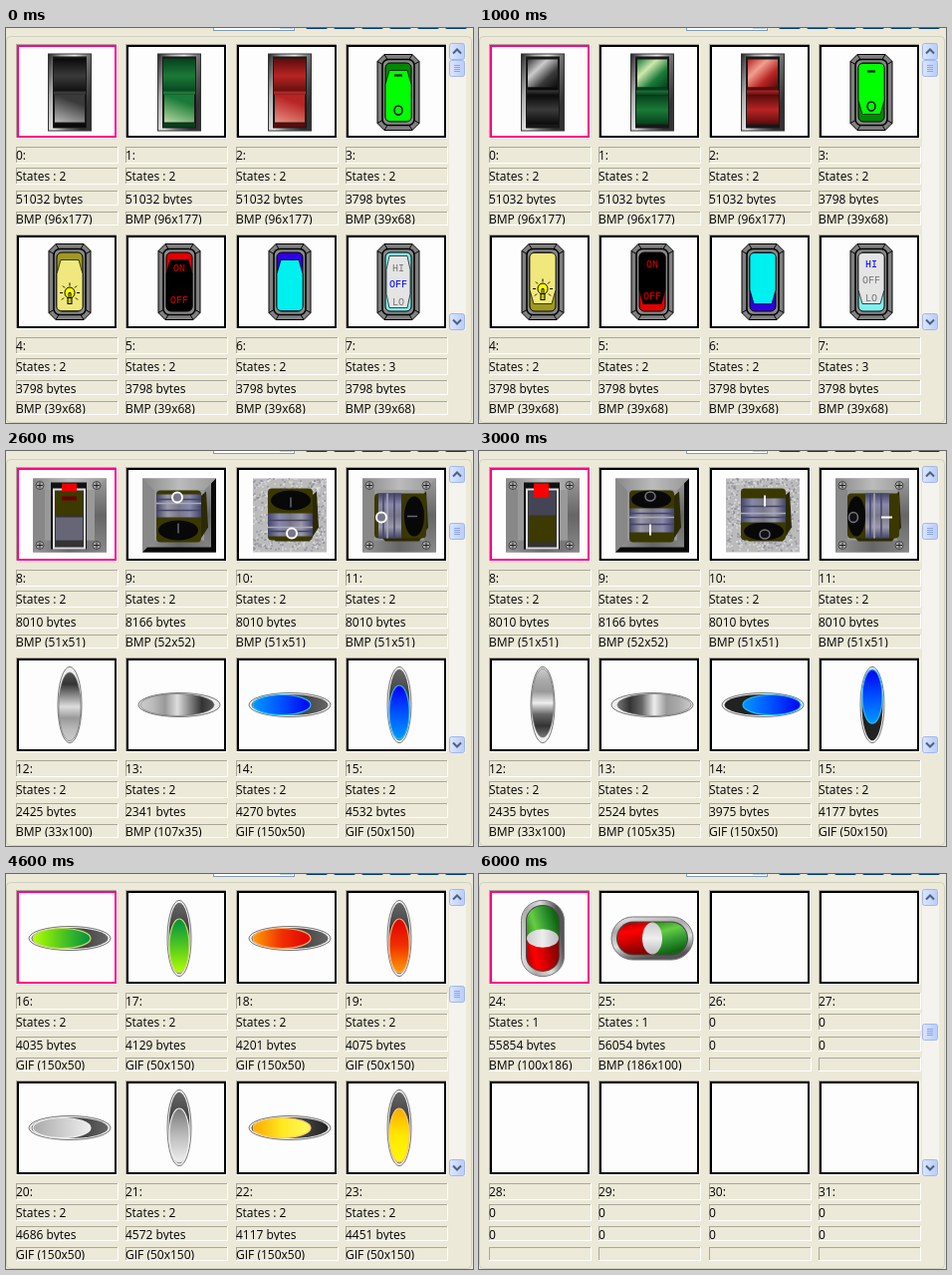
Write an HTML page that moves like this. It is 469 by 396 pixels and loops after 7000 ms.

```html
<!DOCTYPE html>
<html lang="en">
<head>
<meta charset="utf-8">
<title>Switch gallery</title>
<style>
html, body { margin: 0; width: 100%; height: 100%; overflow: hidden; background: #ece9d8; }
svg { display: block; }
text { font: 12px "Open Sans", "Noto Sans", sans-serif; }
.mono { font: 10px "Liberation Mono", monospace; text-anchor: middle; }
</style>
</head>
<body>
<svg id="stage" width="469" height="396"></svg>
<script>
// Drawing helpers: each returns SVG markup
let defs = '', ids = 0;
const rect = (x, y, w, h, fill, more = '') =>
  `<rect x="${x}" y="${y}" width="${w}" height="${h}" fill="${fill}" ${more}/>`;
const oval = (cx, cy, rx, ry, fill, more = '') =>
  `<ellipse cx="${cx}" cy="${cy}" rx="${rx}" ry="${ry}" fill="${fill}" ${more}/>`;
const path = (d, fill, more = '') => `<path d="${d}" fill="${fill}" ${more}/>`;
const line = (d, color, width = 1) => path(d, 'none', `stroke="${color}" stroke-width="${width}"`);
const group = (transform, body) => `<g transform="${transform}">${body}</g>`;
const black = 'stroke="#000"';

function grad(colors, x2 = 1, y2 = 0) {
  const list = colors.split(' '), id = 'g' + ids++;
  const stops = list.map((c, i) => `<stop offset="${i / (list.length - 1)}" stop-color="${c}"/>`);
  defs += `<linearGradient id="${id}" x2="${x2}" y2="${y2}">${stops.join('')}</linearGradient>`;
  return `url(#${id})`;
}

let seed = 7;
const random = () => (seed = seed * 16807 % 2147483647) / 2147483647;

// Pictures are centred on 0,0; state 0 or 1 picks the pose
const rocker = (dark, mid, light) => state => {
  const frame = rect(-21.5, -38.5, 43, 77, grad('#222 #aaa #eee #777 #333', 1, .5), 'stroke="#333"') +
    rect(-17, -36, 34, 72, '#181818');
  const shade = grad(`${dark} ${mid} ${dark}`, 0, 1);
  return frame + (state
    ? rect(-15, -33, 30, 28, grad(`${mid} ${light} ${mid} ${dark}`, 1, 1)) +
      rect(-15, -5, 30, 3, dark) + rect(-16, -2, 32, 5, grad(`${mid} ${dark}`, 0, 1)) +
      rect(-16, 3, 32, 29, shade)
    : rect(-16, -34, 32, 35, shade) + rect(-16, -1, 32, 3, mid) +
      rect(-15, 2, 30, 28, grad(`${mid} ${light}`, -.4, 1)) +
      rect(-16, 31, 32, 4, dark));
};

const housing = (face, lip, marks, neutral) => state => {
  const shape = neutral && !state
    ? 'M-9-26H9L12-12V12L9 26H-9L-12 12V-12Z'
    : 'M-9-22H9L13-8V25Q13 29 9 29H-9Q-13 29-13 25V-8Z';
  return path('M-14-38H14L21-31V31L14 38H-14L-21 31V-31Z', '#808080', black) +
    line('M-14-38L-11-33M14-38L11-33M-14 38L-11 33M14 38L11 33M-21-31L-16-28M21-31L16-28M-21 31L-16 28M21 31L16 28', '#000') +
    rect(-16, -33, 32, 66, '#888', 'rx="6" stroke="#000" stroke-width="1.6"') +
    rect(-13, -29.5, 26, 59, lip, `rx="5" ${black}`) +
    group(`scale(1 ${state ? -1 : 1})`, path(shape, face, 'stroke="#000" stroke-width=".7"')) +
    group(`translate(0 ${state ? -4 : 0})`, marks(state));
};
const word = (s, y, color) => `<text class="mono" y="${y + 3.5}" fill="${color}">${s}</text>`;
const onOff = () => line('M-4-17H4', '#000', 2) + oval(0, 18, 4, 4.5, 'none', 'stroke="#000" stroke-width="1.5"');
const bulb = () => oval(0, 11, 5, 5.5, '#ff0', black) + rect(-2, 16, 4, 6, '#cc0', black) +
  line('M0 1V4M-7 4L-5 6M7 4L5 6M-10 11H-7M10 11H7M-8 18L-6 16M8 18L6 16M-1 16V11H1V16', '#000');
const levels = state => word('HI', -14, state ? '#00f' : '#777') +
  word('OFF', 2, state ? '#777' : '#00f') + word('LO', 20, '#777');

const bevel = () => rect(-37, -37, 74, 74, '#888') +
  path('M-37-37H37L25-25H-25Z', grad('#888 #bbb #999')) + path('M37-37V37L25 25V-25Z', grad('#999 #666 #888', 0, 1)) +
  path('M-37 37H37L25 25H-25Z', grad('#999 #666 #888')) + rect(-25, -25, 50, 50, '#999');
const darkPlate = () => bevel() + path('M37-37V37H-37L-32 32H32V-32Z', '#080808');
const screwedPlate = () => bevel() + [-30, 27].map(x => [-30, 30].map(y =>
  oval(x, y, 4, 4, '#aaa', 'stroke="#444"') + line(`M${x - 3} ${y}h6m-3-3v6`, '#222')).join('')).join('');
function speckledPlate() {
  let dots = rect(-37, -37, 74, 74, '#bbb');
  for (let i = 0; i < 600; i++) {
    dots += rect(Math.floor(random() * 73) - 37, Math.floor(random() * 73) - 37, 2, 1, random() < .5 ? '#e4e4e4' : '#889');
  }
  return dots;
}

const plateSwitch = state => screwedPlate() +
  rect(-19, -33, 36, 67, '#111') + rect(-16, -26, 31, 59, '#333', 'stroke="#ddd" stroke-width="2"') +
  (state
    ? rect(-14, -24, 27, 24, '#445') + rect(-14, 1, 27, 26, '#3c3a00') + rect(-9, -32, 15, 14, '#f00')
    : rect(-14, -24, 27, 24, '#3c3a00') + rect(-8, -32, 15, 8, '#e00') +
      rect(-8, -19, 15, 4, '#600') + rect(-14, 2, 27, 23, '#667'));

const knob = (plate, angle) => state => {
  const band = (y, h) => rect(-23, y, 45, h, grad('#446 #99a #778 #88a #446')) +
    line(`M-23 ${y + 5}h45m-45 11h45`, '#446', 1.5) + line(`M-23 ${y + 9}h45`, '#aab', 1.5);
  const olive = '#3a3800';
  return plate() + path('M20-18L27-24 29 12 20 26H-14L-20 20Z', '#2c2a00') + group(`rotate(${angle})`,
    rect(-23, -25, 45, 52, olive, 'rx="4"') + (state
      ? oval(-1, -16, 20, 9, '#080808') + oval(-2, -19, 5, 4.5, '#111', 'stroke="#778" stroke-width="1.5"') +
        band(-7, 24) + line('M-2 9V20', '#fff', 2)
      : band(-21, 23) + oval(-2, -18, 5, 5, '#778', 'stroke="#fff" stroke-width="2"') +
        oval(-1, 15, 20, 10, '#080808') + line('M-1 8V18', '#667', 1.5)));
};

const upright = body => group('rotate(-90) scale(.93 1)', body);
const ring = oval(0, 0, 41, 12, '#eee', 'stroke="#555" stroke-width=".8"');
const steel = vertical => state => {
  const body = ring + oval(state ? 2 : -2, 0, 37, 11,
    grad(state ? '#777 #333 #666 #eee #999 #aaa #ccc' : '#ccc #bbb #999 #ddd #888 #333 #555'),
    'stroke="#666" stroke-width=".6"');
  return vertical ? upright(body) : body;
};
const slider = (colors, rim, vertical, bases = ['#666', '#222']) => state => {
  const body = ring + oval(0, 0, 38.5, 10.5, grad(`${bases[state]} ${bases[state]} #444 ${bases[state]}`)) +
    oval(state ? 9 : -8, 0, 29, 10, grad(colors), `stroke="${rim}" stroke-width="1.2"`);
  return vertical ? upright(body) : body;
};
const capsule = vertical => () => {
  const body = rect(-41, -21.5, 82, 43, grad('#eee #aaa #ddd #555', .3, 1), 'rx="21.5" stroke="#777"') +
    rect(-36, -17, 72, 34, '#444', 'rx="17"') +
    path('M0-16H-19A16 16 0 0 0-19 16H0Z', grad('#900 #f00 #c00 #800', .2, 1)) +
    path('M0-16H19A16 16 0 0 1 19 16H0Z', grad('#2a8a1a #6c4 #393 #161', .3, 1)) +
    oval(0, 0, 10, 16, grad('#ccc #eee #bbb', 0, 1));
  return vertical ? upright(body) : body;
};

const blue = '#0098ff #0050ff #0000f0', green = '#b0ff00 #50c820 #009040', red = '#ff9c00 #f03000 #e00000';
const pictures = [
  rocker('#0a0a0a', '#3a3a3a', '#ccc'), rocker('#06401c', '#1a7a38', '#cfe8b0'),
  rocker('#5a0c0c', '#b82424', '#f0a090'), housing('#0f0', '#080', onOff),
  housing('#f0e87c', '#a09820', bulb), housing('#000', '#e00000', () => word('ON', -14, '#d00') + word('OFF', 18, '#d00')),
  housing('#00f0f0', '#3000e0', () => ''), housing('#e4e4e4', '#80f0f0', levels, true),
  plateSwitch, knob(darkPlate, 0), knob(speckledPlate, 180), knob(screwedPlate, -90),
  steel(true), steel(false), slider(blue, '#2bf'), slider(blue, '#2bf', true),
  slider(green, '#cd6'), slider(green, '#cd6', true),
  slider(red, '#fa6'), slider(red, '#fa6', true),
  slider('#aaa #ccc #eee', '#eee'), slider('#eee #bbb #777', '#eee', true),
  slider('#ffa800 #ffe820 #fff860', '#fc6', false, ['#222', '#666']), slider('#fff800 #ffe800 #ffa800', '#fc6', true),
  capsule(true), capsule(false)
];

// One entry per second: page, file sizes, picture formats
const switches = [0, '51032 51032 51032 3798 3798 3798 3798 3798',
  '96x177 96x177 96x177 39x68 39x68 39x68 39x68 39x68'];
const ovals = '150x50 50x150 150x50 50x150 150x50 50x150 150x50 ';
const scenes = [
  switches, switches,
  [1, '8010 8166 8010 8010 2425 2341 4270 4532', '51x51 52x52 51x51 51x51 33x100 107x35 150x50 50x150'],
  [1, '8010 8166 8010 8010 2435 2524 3975 4177', '51x51 52x52 51x51 51x51 33x100 105x35 150x50 50x150'],
  [2, '4035 4129 4201 4075 4686 4572 4117 4451', ovals + '50x150'],
  [2, '4168 4346 3773 4071 4337 4413 4086 4153', ovals + '50x153'],
  [3, '55854 56054', '100x186 186x100']
];

const label = (y, h, baseline, s) =>
  rect(0, y, 103, h, '#fff') + rect(0, y, 102, h - 1, '#aca899') + rect(1, y + 1, 101, h - 2, '#ece9d8') +
  `<svg y="${y}" width="102" height="${h - 1}"><text y="${baseline}">${s}</text></svg>`;

function cell(i, index, state, size, format) {
  const row = i >> 2, used = index < pictures.length;
  const lines = used
    ? [`States : ${index > 23 ? 1 : index === 7 ? 3 : 2}`, `${size} bytes`,
       `${index > 13 && index < 24 ? 'GIF' : 'BMP'} (${format})`]
    : ['0', '0', ''];
  return group(`translate(${[10, 120, 231, 341][i % 4]} ${16 + row * 191})`,
    rect(0, 0, 102, 95, '#fff') + rect(0, 0, 101, 94, '#aca899') +
    rect(2, 2, 98, 91, '#fdfdfd', `stroke="${i ? '#000' : '#f08'}" stroke-width="2"`) +
    (used ? group(`translate(${index === 3 || index === 7 ? 53 : 54} ${row ? 47.5 : 48.5})`, pictures[index](state)) : '') +
    label(103, 17, 13, index + ':') + label(124, 17, 13, lines[0]) +
    label(147 - row, 15, 13, lines[1]) + label(168 - row, 14, 12, lines[2]));
}

const button = (y, mark = '') => group(`translate(445 ${y})`,
  rect(.5, .5, 15, 16, grad('#dce6ff #b8ccf8'), 'rx="2" stroke="#a4b8e8"') + mark);
const chevron = d => line(d, '#4d6185', 2);
const grip = line('M5 5.5H11M5 7.5H11M5 9.5H11M5 11.5H11', '#8ca6e0');

function scene([page, sizes, formats], n) {
  const size = sizes.split(' '), format = formats.split(' ');
  let body = button([32, 72, 112, 150][page], grip);
  for (let i = 0; i < 8; i++) body += cell(i, page * 8 + i, n % 2, size[i], format[i]);
  return `<g class="scene">${body}</g>`;
}

let chrome = rect(.5, 8.5, 467, 387, 'none', 'rx="4" stroke="#d0d0bf"') +
  rect(208.5, -5, 81, 7.5, '#fff', 'stroke="#7f9db9"') + rect(275, 0, 13, 1, '#c1d3fb') +
  rect(445, 16, 17, 287, '#f4f3ee') +
  button(15, chevron('M4 10.5L8 6.5 12 10.5')) + button(286, chevron('M4 6.5L8 10.5 12 6.5'));
for (let i = 0; i < 6; i++) chrome += rect(301 + i * 28, -4, 22, 5, '#003c74', 'rx="2"');

const content = chrome + scenes.map(scene).join('');
const stage = document.getElementById('stage');
stage.innerHTML = `<defs>${defs}</defs>${content}`;
const layers = stage.querySelectorAll('.scene');

function draw() {
  const now = Math.floor(performance.now() % 7000 / 1000);
  layers.forEach((layer, i) => layer.style.display = i === now ? '' : 'none');
  requestAnimationFrame(draw);
}
draw();
</script>
</body>
</html>
```
